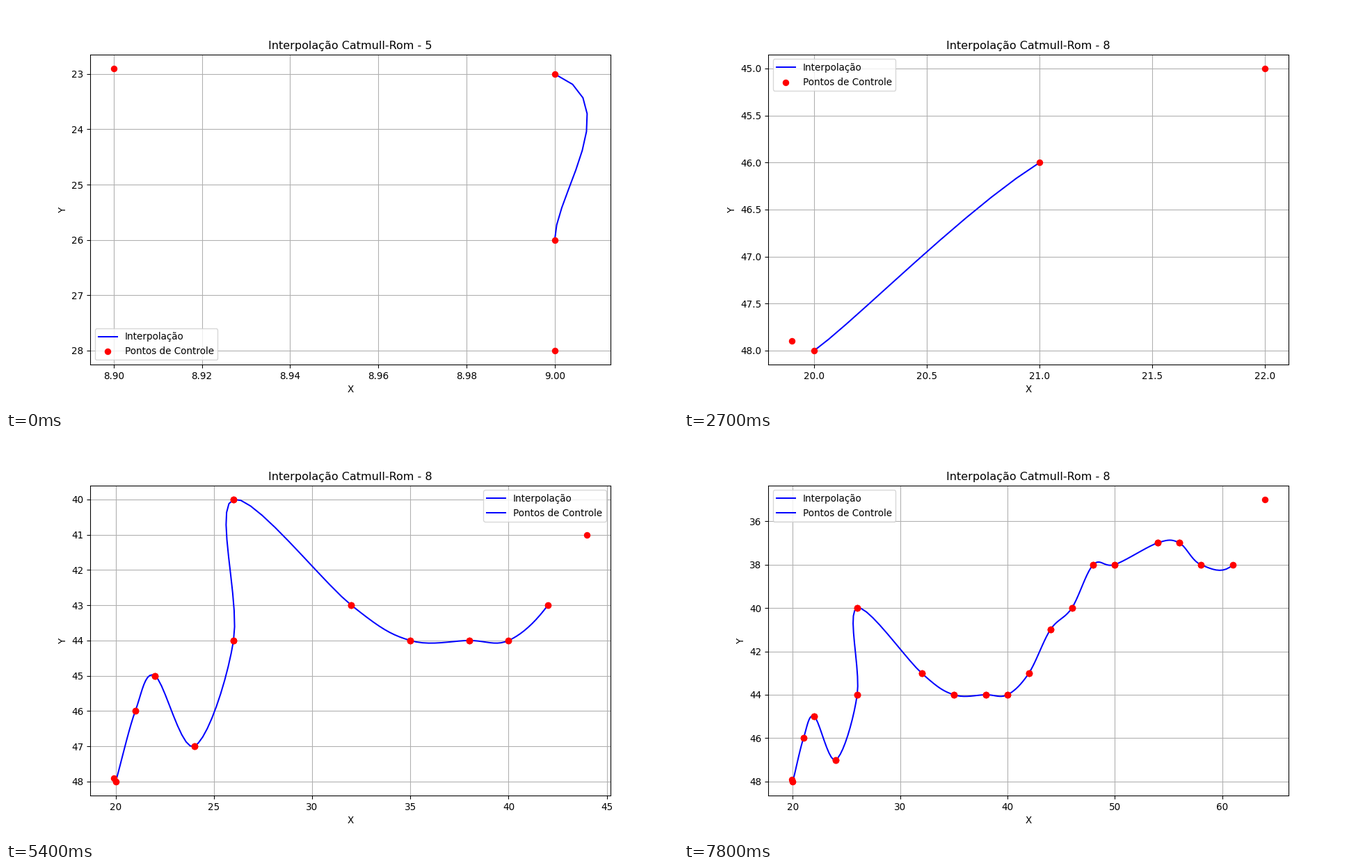
Write a matplotlib script that moves like this. It is 966 by 580 pixels and loops after 8000 ms.

```python
import numpy as np
import matplotlib.pyplot as plt
from matplotlib.animation import FuncAnimation

plt.rcParams.update({"font.family": "DejaVu Sans", "font.size": 10.04,
                     "axes.titlesize": 11.9})

DPI = 97
INTERVAL = 100
FRAMES_PER_STEP = 3
TOTAL_FRAMES = 80


def descent(count=10):
    """A straight drop that turns right, with a slight wobble in its pace."""
    i = np.arange(count)
    angle = i * np.pi / 2
    y = 23 + 2.8 * i + 0.4 * np.cos(angle) - 0.2 * np.sin(angle)
    return np.column_stack([np.maximum(9, 2 * i), np.rint(y)])


def walk(start, *bends):
    """Whole-number points from bend to bend; a bend is (x, y[, steps])."""
    path = [start]
    for x, y, *steps in bends:
        count = steps[0] if steps else 1
        path.extend(np.rint(np.linspace(path[-1], (x, y), count + 1)[1:]))
    return np.array(path, float)


def with_ends(points, offset=0.1):
    """Add the helper points that let the curve reach both ends."""
    return np.vstack([points[0] - offset, points, points[-1] + offset])


def catmull_rom(p0, p1, p2, p3, samples=11):
    t = np.linspace(0, 1, samples)[:, None]
    return 0.5 * (2 * p1 + (p2 - p0) * t
                  + (2 * p0 - 5 * p1 + 4 * p2 - p3) * t**2
                  + (3 * p1 - p0 - 3 * p2 + p3) * t**3)


ridge = walk((20, 48), (22, 45, 2), (24, 47), (26, 44), (26, 40), (32, 43),
             (38, 44, 2), (42, 43, 2), (48, 38, 3), (50, 38), (54, 37),
             (56, 37), (61, 38, 2), (64, 35))

# One more control point appears with every step.
STEPS = [(number, points[:count])
         for number, points in ((5, with_ends(descent())),
                                (8, with_ends(ridge)))
         for count in range(4, len(points) + 1)]

# The tiny surplus keeps the pixel size from rounding below 966 x 580.
fig = plt.figure(figsize=(966.01 / DPI, 580.01 / DPI), dpi=DPI)
ax = fig.add_subplot()


def draw(frame):
    number, points = STEPS[frame // FRAMES_PER_STEP]
    ax.clear()
    lines, dots = [], []
    for i in range(len(points) - 3):
        window = points[i:i + 4]
        lines += ax.plot(*catmull_rom(*window).T, color="blue")
        dots.append(ax.scatter(*window.T, color="red", zorder=3))
    ax.set_title(f"Interpolação Catmull-Rom - {number}")
    ax.set_xlabel("X")
    ax.set_ylabel("Y")
    ax.invert_yaxis()
    ax.grid(True)
    ax.legend((lines + dots)[:2], ["Interpolação", "Pontos de Controle"],
              loc="best")
    return []


anim = FuncAnimation(fig, draw, frames=TOTAL_FRAMES, interval=INTERVAL,
                     init_func=lambda: [], repeat=True, repeat_delay=0,
                     blit=False)
plt.show()
```
